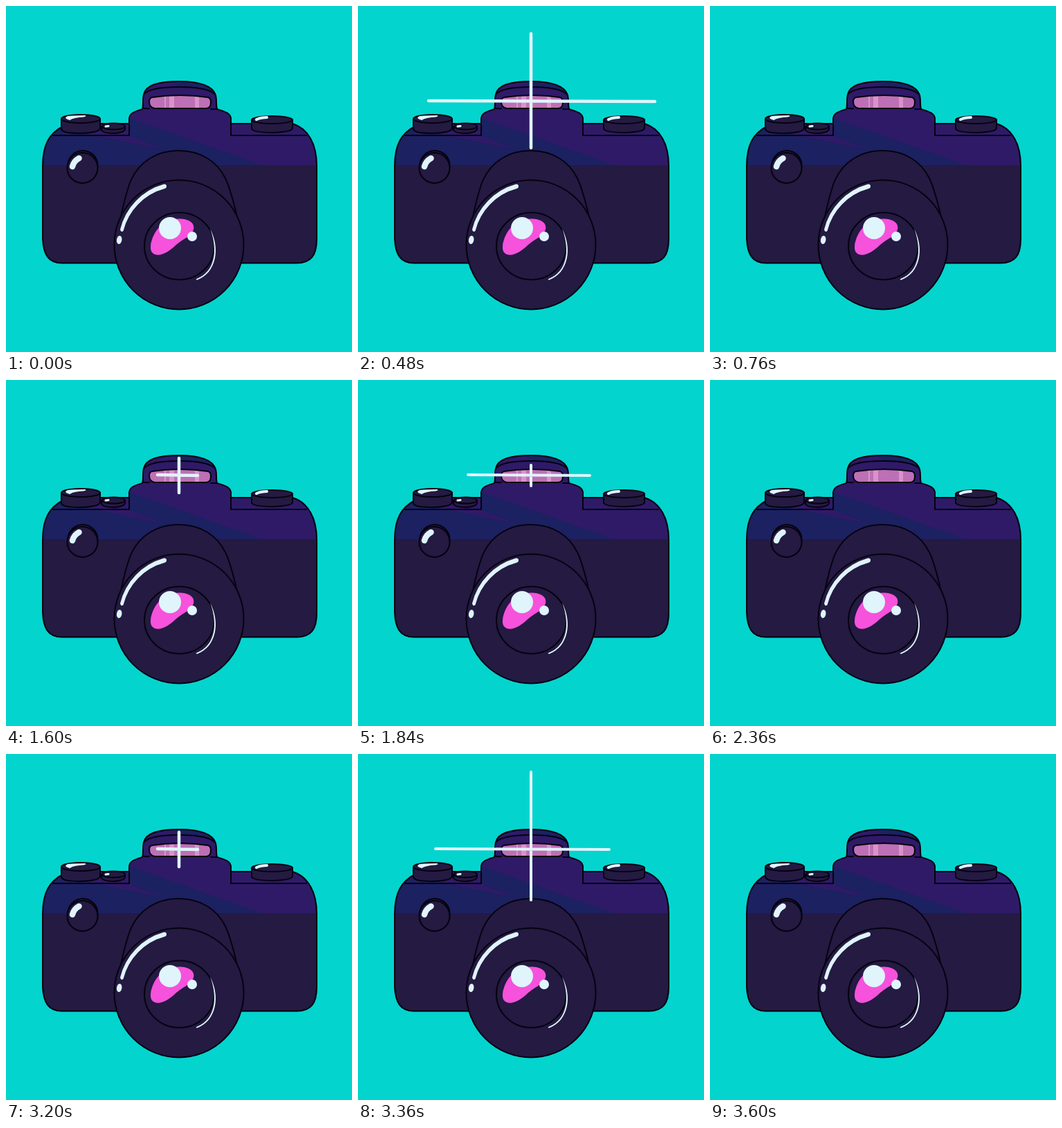
An HTML page for the animation above (3880 ms loop, 500x500 px).

```html
<!DOCTYPE html>
<html lang="en">
<head>
<meta charset="utf-8">
<title>Camera flash</title>
<style>
  html, body { margin: 0; width: 100%; height: 100%; overflow: hidden; background: #04d4ce; }
  svg { display: block; width: 100%; height: 100%; }
  .line { fill: none; stroke: #05020f; stroke-width: 2; stroke-linejoin: round; stroke-linecap: round; }
  .dark { fill: #241a42; }
  .blue { fill: #1b2161; }
  .purple { fill: #2f1a68; }
  .shine { fill: #e0f4fc; }
  .glint { fill: none; stroke: #e0f4fc; stroke-linecap: round; }
</style>
</head>
<body>
<svg viewBox="0 0 500 500">
  <defs>
    <path id="body" d="M53 231C53 200 63 184 82 174L90 170H178V162C179 154 188 152 197 149C199 143 197 135 199 128C202 114 220 109 250 109C281 109 299 116 303 129C305 137 303 143 305 149C314 152 324 154 325 162V170H414C437 177 449 200 449 231V337C449 360 441 371.500 420 371.500H81C61 371.500 54 359 53 336Z"/>
    <path id="window" d="M211 132Q251 126 292 132Q296 133 296 139Q296 148 289 148H215Q207 147 207 138Q207 133 211 132Z"/>
    <clipPath id="bodyClip"><use href="#body"/></clipPath>
    <clipPath id="windowClip"><use href="#window"/></clipPath>
  </defs>

  <g clip-path="url(#bodyClip)">
    <path class="purple" d="M40 100H460V231H40Z"/>
    <path class="blue" d="M40 169L250 212V231H40ZM178 162L373 231H290L178 188Z"/>
    <path class="blue" d="M235 105H310V129H303C297 121 279 117 250 117Z"/>
    <path class="dark" d="M40 230H460V380H40Z"/>
  </g>
  <use href="#body" class="line"/>
  <path class="line" d="M68 187H178V170M325 170V187H434M199 128C205 120 222 117 250 117C279 117 297 121 303 129M198 147Q200 149 207 148M296 149H305"/>

  <use href="#window" fill="#bd70b5"/>
  <g clip-path="url(#windowClip)" fill="#d993cb">
    <path d="M229 125H231V150H229ZM236 125H243V150H236ZM273 125H279V150H273Z"/>
  </g>
  <use href="#window" class="line"/>

  <g class="line">
    <path class="dark" d="M80 164V178Q81 184 108 184Q135 183 136 177V163"/>
    <ellipse class="dark" cx="108" cy="163" rx="28" ry="6"/>
    <path class="dark" d="M138 174V179Q140 184 156 184Q171 183 172 178V174"/>
    <ellipse class="dark" cx="155.500" cy="174" rx="16.500" ry="4.500"/>
    <path class="dark" d="M355 165V178Q359 183 385 183Q413 182 414 177V164"/>
    <ellipse class="dark" cx="384.500" cy="164.500" rx="29.500" ry="5.500"/>
    <circle class="dark" cx="111" cy="230.500" r="21.500"/>
    <circle class="dark" cx="110.500" cy="234" r="22"/>
  </g>
  <path class="shine" d="M87 163Q84 159 95 158.500L114 158Q118 159 112 160.500Q98 161 92 165Z"/>
  <path class="glint" stroke-width="3" d="M144 174L148 173.500"/>
  <path class="glint" stroke-width="4" d="M362 164Q368 161 377 161"/>
  <path class="glint" stroke-width="8.500" d="M96 232Q98 224 105.500 220"/>

  <g class="line">
    <path class="dark" d="M157 338C166 314 168 283 180.500 252C193 224 219 209 249 209C281 209 305 224 317.500 250C331 280 333 311 343 338Z"/>
    <circle class="dark" cx="250" cy="345" r="93.500"/>
    <ellipse class="dark" cx="250.500" cy="347" rx="50.500" ry="48.500"/>
  </g>
  <path class="shine" d="M165 323A90 90 0 0 1 228 257.500Q232 257 232 260.500Q232 263 229 264A84 84 0 0 0 169.500 325Q166 328 165 323Z"/>
  <ellipse class="shine" cx="163.700" cy="338" rx="3.700" ry="6" transform="rotate(10 163.700 338)"/>
  <path class="shine" d="M295 322C310 350 304 386 276 396Q273 395 277 393.500C301 384 307 354 295 322Z"/>
  <path fill="#f652dc" d="M209 347C211 329 224 310 245 308C260 306 274 312 271 323C268 333 256 336 246 345C236 355 224 362 215 359Q208 356 209 347Z"/>
  <circle class="shine" cx="237" cy="321" r="16"/>
  <circle class="shine" cx="269" cy="333" r="7"/>

  <path id="flash" class="glint"/>
</svg>
<script>
  const LOOP = 3880;
  const FLASH_STARTS = [3200, 1960, 1600, 360];

  // Each pose lasts until its time; the beam ends are left, right, top, bottom.
  const POSES = [
    { until: 40,  beam: [219, 277, 113, 163], width: 4.5 },
    { until: 120, beam: [150, 350, 75, 190],  width: 5 },
    { until: 160, beam: [102, 429, 40, 205],  width: 4.5 },
    { until: 240, beam: [112, 363, 26, 211],  width: 4 },
    { until: 280, beam: [159, 335, 123, 153], width: 4 },
    { until: 360, beam: [195, 305, 129, 147], width: 3.5 },
    { until: 400, beam: [228, 273, 134, 142], width: 3 }
  ];
  const flash = document.getElementById("flash");

  function poseAt(time) {
    const start = FLASH_STARTS.find(s => time >= s);
    return start === undefined ? undefined : POSES.find(p => time - start < p.until);
  }

  function draw() {
    const pose = poseAt(performance.now() % LOOP);
    if (pose) {
      const [left, right, top, bottom] = pose.beam;
      flash.setAttribute("d", `M${left} 137L${right} 138M250 ${top}V${bottom}`);
      flash.setAttribute("stroke-width", pose.width);
    } else {
      flash.setAttribute("d", "");
    }
    requestAnimationFrame(draw);
  }
  draw();
</script>
</body>
</html>
```
